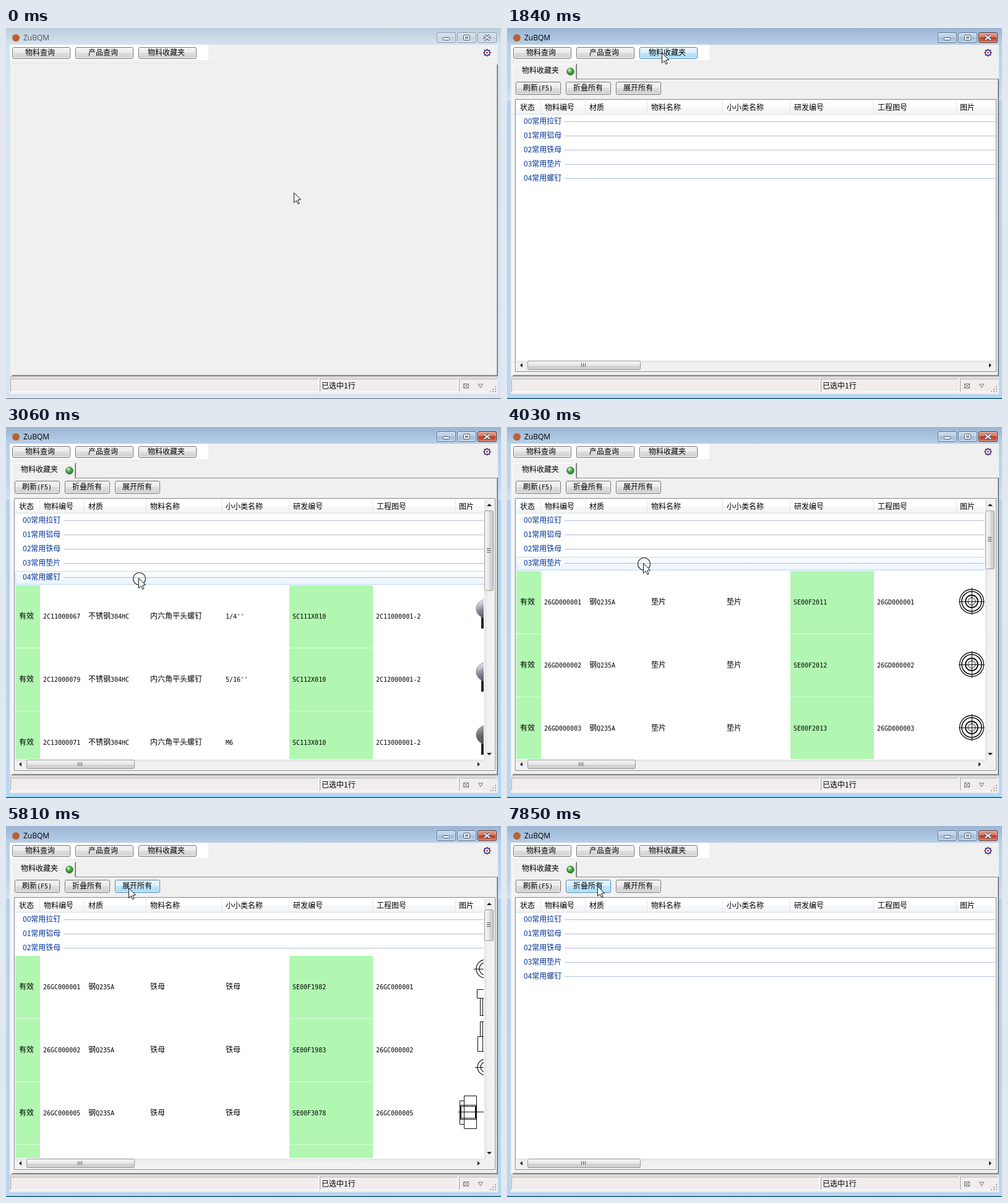
Write an HTML page with a canvas that moves like this. It is 800x600 px and loops after 8 s.

```html
<!DOCTYPE html>
<html lang="zh">
<head>
<meta charset="utf-8">
<style>
html, body { margin: 0; width: 100%; height: 100%; overflow: hidden; }
canvas { display: block; width: 800px; height: 600px; }
</style>
</head>
<body>
<canvas id="stage" width="800" height="600"></canvas>
<script>
const g = document.getElementById('stage').getContext('2d');
const LOOP = 8000;
const UI = '12px "Noto Sans CJK SC", "Noto Sans CJK JP", sans-serif';
const MONO = '10px "DejaVu Sans Mono", monospace';

// Cursor moves: start, end, number of steps, target x, target y
const moves = [
  [430, 1020, 5, 250, 40], [2120, 2790, 6, 214, 244], [3210, 3600, 4, 220, 220],
  [4170, 4450, 3, 228, 191], [4970, 5660, 6, 152, 103], [5810, 5810, 1, 198, 100],
  [5930, 5930, 1, 197, 97], [7030, 7165, 2, 146, 96], [7850, 7850, 1, 146, 97]
];
const clicks = [[1450, 1840], [2925, 3210], [3600, 4170], [4450, 4970], [6200, 6480], [7300, 7570]];
// Groups from this index on are expanded (5 = none)
const stages = [[0, 5], [3060, 4], [4030, 3], [4730, 2], [6340, 0], [7435, 5]];
const thumbLen = [31, 40, 51, 95, 130];

const GREEN = '#b1f7b1', YELLOW = '#fafa00';
const colX = [21, 60, 133, 233, 355, 463, 598, 732];
const heads = ['状态', '物料编号', '材质', '物料名称', '小小类名称', '研发编号', '工程图号', '图片'];
const groups = [
  { name: '00常用拉钉', color: YELLOW, pics: [target, target], rows: [
    '待定|26GA000001|铁1010A|平头铆螺母|拉钉|SE00F1988|26GA000001',
    '待定|26GA000002|铁1010A|平头铆螺母|拉钉|SE00F1989|26GA000002'] },
  { name: '01常用铝母', color: GREEN, pics: [tube, y => tube(y - 10, 6)], rows: [
    "有效|2422000003|铝6063/T5|铝母型铝件|攻牙1/4|AC0402-18|2422000003", '有效'] },
  { name: '02常用铁母', color: GREEN, pics: [topPlan, lowPlan, nut], rows: [
    '有效|26GC000001|钢Q235A|铁母|铁母|SE00F1982|26GC000001',
    '有效|26GC000002|钢Q235A|铁母|铁母|SE00F1983|26GC000002',
    '有效|26GC000005|钢Q235A|铁母|铁母|SE00F3078|26GC000005', '有效'] },
  { name: '03常用垫片', color: GREEN, pics: [target, target, target], rows: [
    '有效|26GD000001|钢Q235A|垫片|垫片|SE00F2011|26GD000001',
    '有效|26GD000002|钢Q235A|垫片|垫片|SE00F2012|26GD000002',
    '有效|26GD000003|钢Q235A|垫片|垫片|SE00F2013|26GD000003', '有效'] },
  { name: '04常用螺钉', color: GREEN, pics: [screw, screw, y => screw(y, '#a8a8a8', '#686868')], rows: [
    "有效|2C11000067|不锈钢304HC|内六角平头螺钉|1/4''|SC111X010|2C11000001-2",
    "有效|2C12000079|不锈钢304HC|内六角平头螺钉|5/16''|SC112X010|2C12000001-2",
    '有效|2C13000071|不锈钢304HC|内六角平头螺钉|M6|SC113X010|2C13000001-2'] }
];

function box(x, y, w, h, fill) {
  g.fillStyle = fill;
  g.fillRect(x, y, w, h);
}
function grad(x0, y0, x1, y1, ...stops) {
  const s = g.createLinearGradient(x0, y0, x1, y1);
  stops.forEach(([at, c]) => s.addColorStop(at, c));
  return s;
}
function round(x, y, w, h, r, fill, edge) {
  g.beginPath();
  g.roundRect(x + .5, y + .5, w - 1, h - 1, r);
  if (fill) { g.fillStyle = fill; g.fill(); }
  if (edge) { g.lineWidth = 1; g.strokeStyle = edge; g.stroke(); }
}
function frame(x, y, w, h, c) { round(x, y, w, h, 0, null, c); }
function poly(pts, fill, edge, open) {
  g.beginPath();
  pts.forEach(([x, y]) => g.lineTo(x, y));
  if (!open) g.closePath();
  if (fill) { g.fillStyle = fill; g.fill(); }
  if (edge) { g.lineWidth = 1; g.strokeStyle = edge; g.stroke(); }
}
function oval(x, y, rx, ry, fill, edge, w = 1, turn = 0) {
  g.beginPath();
  g.ellipse(x, y, rx, ry, turn, 0, Math.PI * 2);
  if (fill) { g.fillStyle = fill; g.fill(); }
  if (edge) { g.lineWidth = w; g.strokeStyle = edge; g.stroke(); }
}
function text(s, x, mid, color = '#000', font = UI) {
  g.font = font;
  g.fillStyle = color;
  g.fillText(s, x, mid + 4);
}
// Chinese and Latin runs use different fonts
function mixed(s, x, mid) {
  for (const run of s.match(/[ -~]+|[^ -~]+/g)) {
    text(run, x, mid, '#000', run < '\x7f' ? MONO : UI);
    x += g.measureText(run).width;
  }
}

function button(label, x, y, w, h, tx, s) {
  const hot = s.x >= x && s.x < x + w && s.y >= y && s.y < y + h;
  const c = hot ? ['#eaf6fd', '#d9f0fc', '#bee6fd', '#a7d9f5'] : ['#f3f3f3', '#ebebeb', '#dddddd', '#cfcfcf'];
  round(x, y, w, h, 2.5, grad(0, y, 0, y + h, [0, c[0]], [.5, c[1]], [.5, c[2]], [1, c[3]]), hot ? '#3c7fb1' : '#707070');
  round(x + 1, y + 1, w - 2, h - 2, 1.5, null, 'rgba(255,255,255,.75)');
  mixed(label, tx, y + h / 2 | 0);
}

function captionButtons(active) {
  [696, 729, 762].forEach((x, i) => {
    const red = active && i === 2;
    const c = red ? ['#e3a391', '#d6715b', '#b93a22', '#d27a5c']
      : active ? ['#cbdcee', '#b9cfe6', '#a3bdd9', '#b9d1e9'] : ['#d5e1ed', '#cddae8', '#c3d2e2', '#cfdcea'];
    round(x, 7, 31, 17, 2.5, grad(0, 7, 0, 24, [0, c[0]], [.5, c[1]], [.5, c[2]], [1, c[3]]),
      red ? '#5c2420' : active ? '#60758f' : '#8796a8');
    round(x + 1, 8, 29, 15, 2, null, 'rgba(255,255,255,.45)');
  });
  const ink = '#4a5665';
  round(706, 15, 11, 5, 1, '#fff', ink);
  round(739, 11, 11, 9, 1, '#fff', ink);
  round(742, 14, 5, 3, 0, '#c5d3e2', ink);
  g.lineCap = 'butt';
  [[4.5, ink], [2.2, '#fff']].forEach(([w, c]) => {
    g.beginPath();
    g.moveTo(773, 12); g.lineTo(782, 19);
    g.moveTo(782, 12); g.lineTo(773, 19);
    g.lineWidth = w; g.strokeStyle = c; g.stroke();
  });
}

function gear() {
  for (let i = 0; i < 8; i++) {
    const a = i * Math.PI / 4;
    oval(777.5 + 5 * Math.cos(a), 40 + 5 * Math.sin(a), 1.3, 1.3, i % 2 ? '#25258c' : '#b02030');
  }
  oval(777.5, 40, 4.2, 4.2, '#f4f4ff', '#26267e', 1.2);
  oval(777.5, 40, 1.4, 1.4, '#c02030');
}

function windowFrame(s) {
  box(0, 0, 800, 600, s.active
    ? grad(0, 0, 0, 600, [0, '#9bb5d2'], [.045, '#b7cfe8'], [.15, '#bdd5ee'], [.194, '#d0e3f4'], [.197, '#b5d1ec'], [1, '#b9d6f0'])
    : grad(0, 0, 0, 600, [0, '#bfccda'], [.045, '#d5e2ef'], [1, '#d7e4f2']));
  if (s.active) box(0, 598, 800, 1, '#36bfe8');
  box(0, 599, 800, 1, s.active ? '#26384a' : '#555b62');
  oval(16, 16, 6, 6, '#b9622f');
  text('ZuBQM', 28, 16, s.active ? '#000' : '#4c5660', '12px "Open Sans", "Noto Sans", sans-serif');
  captionButtons(s.active);
  box(6, 27, 789, 565, '#f0f0f0');
  box(7, 27, 320, 25, '#fff');
  button('物料查询', 10, 31, 94, 19, 31, s);
  button('产品查询', 112, 31, 94, 19, 133, s);
  button('物料收藏夹', 214, 31, 94, 19, 229, s);
  gear();
}

function statusBar() {
  box(6, 564, 789, 1, '#a0a0a0');
  box(6, 565, 789, 27, '#f1eded');
  box(6, 565, 789, 1, '#fff');
  [[7, 499], [507, 224], [732, 62]].forEach(([x, w], i) => {
    box(x, 567, w, 1, '#a0a0a0');
    box(x, 567, 1, 22, '#a0a0a0');
    box(x, 588, w, 1, '#fff');
    if (i < 2) box(x + w - 1, 567, 1, 22, '#fff');
  });
  text('已选中1行', 510, 579);
  frame(739, 575, 9, 8, '#777');
  poly([[740, 576], [747, 582]], null, '#777', true);
  poly([[747, 576], [740, 582]], null, '#777', true);
  poly([[763.5, 576], [770.5, 576], [767, 582]], null, '#777');
  for (let r = 0; r < 3; r++)
    for (let c = 0; c <= r; c++) box(790 - c * 4, 579 + r * 4, 2, 2, '#a8a4a4');
}

function panelEdges(top) {
  box(9, 59, 1, 503, '#fff');
  box(10, 561, 784, 1, '#a0a0a0');
  box(9, 562, 786, 1, '#696969');
  box(793, top, 1, 503 - top + 59, '#a0a0a0');
  box(794, top, 1, 504 - top + 59, '#696969');
}

function emptyPanel() {
  box(9, 59, 785, 1, '#fff');
  box(9, 58, 785, 1, '#dedede');
  panelEdges(59);
  box(8, 59, 1, 503, '#dedede');
}

function target(y) {
  const cx = 751, cy = y + 49;
  [[19.5, 1.3], [16, 1.6], [10, 1.8], [6, 1]].forEach(([r, w]) => oval(cx, cy, r, r, null, '#111', w));
  box(cx - 21, cy, 42, 1, '#111');
  box(cx, cy - 22, 1, 44, '#111');
}
function tube(y, dx = 0) {
  g.save();
  g.translate(dx, y - 394);
  poly([[735, 443], [764, 429], [763, 421], [772, 415], [790, 410], [790, 470], [772, 476], [752, 485]],
    grad(755, 420, 775, 475, [0, '#707070'], [.4, '#4a4a4a'], [1, '#2c2c2c']));
  oval(745, 463, 11, 22, '#606060', '#393939', 1, -.38);
  oval(747, 463, 5.5, 10, '#b9b9b9', '#262626', 1, -.38);
  g.restore();
}
function plan(cy, r) {
  oval(775, cy, r, r, null, '#111', 1.2);
  oval(775, cy, r - 5, r - 5, null, '#111', 1.2);
  box(775 - r - 4, cy, 30, 1, '#111');
}
function topPlan(y) {
  plan(y + 21, 15);
  frame(761, y + 54, 30, 15, '#111');
  frame(766, y + 68, 20, 29, '#111');
  box(770, y + 69, 1, 28, '#111');
}
function lowPlan(y) {
  frame(766, y + 4, 20, 25, '#111');
  box(770, y + 4, 1, 48, '#111');
  frame(762, y + 28, 30, 25, '#111');
  plan(y + 78, 13);
}
function nut(y) {
  frame(740, y + 22, 21, 54, '#111');
  frame(733, y + 30, 8, 39, '#111');
  frame(734, y + 37, 26, 24, '#111');
  frame(735, y + 39, 24, 20, '#111');
  box(731, y + 48, 41, 1, '#111');
}
function screw(y, light = '#eef0f4', dark = '#8c929c') {
  box(768, y + 46, 6, 24, '#202226');
  oval(779, y + 38, 19, 16, grad(762, y + 26, 772, y + 52, [0, light], [.5, dark], [1, '#50545c']), '#6a6e76', .8);
}

function groupHead(name, mid, right, hot) {
  if (hot) round(15, mid - 10, right + 4, 22, 2, grad(0, mid - 10, 0, mid + 12, [0, '#fdfeff'], [1, '#e9f3fd']), '#b9d9f3');
  text(name, 27, mid, '#003399');
  box(93, mid, right - 93, 1, '#b0c0de');
}

function dataRow(group, i, y, limit) {
  const cells = group.rows[i].split('|');
  [[15, 40, 0], [458, 135, 5]].forEach(([x, w, col]) => {
    if (col < limit) {
      box(x, y, w, 101, group.color);
      box(x, y + 101, w, 1, group.color === YELLOW ? '#fdfd9a' : '#e2fce2');
    }
  });
  cells.slice(0, limit).forEach((c, k) => mixed(c, colX[k], y + 50));
  if (limit > 7 && group.pics[i]) group.pics[i](y);
}

function groupList(s, right) {
  g.save();
  g.beginPath();
  g.rect(14, 140, right - 14, 397);
  g.clip();
  let mid = 151;
  groups.forEach((group, k) => {
    const hot = s.y >= mid - 10 && s.y < mid + 12;
    // During the repaint only the hovered group and part of its rows show
    if (!s.repaint || k >= 2) groupHead(group.name, mid, right, hot);
    if (k < s.open) { mid += 23; return; }
    group.rows.forEach((_, i) => {
      const limit = s.repaint && i < s.repaint ? (i ? 4 : 0) : 8;
      if (limit) dataRow(group, i, mid + 13 + i * 102, limit);
    });
    mid += 26 + 102 * (k === 4 ? 10 : group.rows.length);
  });
  g.restore();
}

function thumb(x, y, w, h) {
  const wide = w > h;
  round(x, y, w, h, 2, wide
    ? grad(0, y, 0, y + h, [0, '#f6f6f6'], [.5, '#e8e8e8'], [.5, '#d8d8d8'], [1, '#cacaca'])
    : grad(x, 0, x + w, 0, [0, '#f6f6f6'], [.5, '#e8e8e8'], [.5, '#d8d8d8'], [1, '#cacaca']), '#979797');
  const cx = x + (w >> 1), cy = y + (h >> 1);
  for (let i = -1; i < 2; i++) {
    if (wide) box(cx + i * 3 - 1, cy - 3, 1, 6, '#555');
    else box(cx - 3, cy + i * 3 - 1, 6, 1, '#555');
  }
}

function scrollBars(right, open) {
  box(15, 538, 774, 16, grad(0, 538, 0, 554, [0, '#e3e3e3'], [.3, '#f0f0f0'], [1, '#f2f2f2']));
  const end = right - 9;
  poly([[25, 542], [25, 549], [21, 545.5]], '#222');
  poly([[end - 1, 542], [end - 1, 549], [end + 3, 545.5]], '#222');
  thumb(33, 538, open < 5 ? 175 : 183, 15);
  if (open === 5) return;
  box(773, 117, 16, 421, grad(773, 0, 789, 0, [0, '#e3e3e3'], [.3, '#f0f0f0'], [1, '#f2f2f2']));
  box(773, 538, 16, 16, '#f0f0f0');
  poly([[777, 128], [785, 128], [781, 124]], '#222');
  poly([[777, 527], [785, 527], [781, 531]], '#222');
  thumb(773, 135, 15, thumbLen[open]);
}

function favorites(s) {
  panelEdges(82);
  box(11, 58, 101, 1, '#fff');
  box(111, 59, 1, 23, '#a0a0a0');
  box(112, 58, 1, 25, '#696969');
  box(113, 82, 682, 1, '#8a8a8a');
  text('物料收藏夹', 24, 69);
  const ball = g.createRadialGradient(100.5, 67.5, 1, 102.5, 70.5, 6.5);
  ball.addColorStop(0, '#c5efbd');
  ball.addColorStop(.45, '#4fae48');
  ball.addColorStop(1, '#1f6e22');
  oval(102.5, 70.5, 5.8, 5.8, ball, '#2f6a30', .8);
  button('刷新(F5)', 14, 87, 73, 21, 26, s);
  button('折叠所有', 95, 87, 73, 21, 107, s);
  button('展开所有', 176, 87, 73, 21, 188, s);

  box(13, 115, 778, 441, '#fff');
  frame(13, 115, 778, 441, '#828790');
  const right = s.open < 5 ? 772 : 789;
  box(14, 116, right - 14, 23, grad(0, 116, 0, 139, [0, '#fff'], [.5, '#fff'], [.5, '#f8f9fa'], [1, '#f2f3f5']));
  box(14, 139, right - 14, 1, '#dcdee2');
  [54, 126, 226, 348, 457, 592, 726].forEach(x => box(x, 117, 1, 22, '#e3e5e9'));
  heads.forEach((h, i) => text(h, colX[i] + (i === 1 || i > 4 && i < 7 ? 1 : 0), 129));
  groupList(s, right);
  scrollBars(right, s.open);
}

function pointer({ x, y, ring }) {
  if (ring) oval(x + 1.5, y + 1.5, 10, 10, null, '#111', 1.1);
  g.save();
  g.translate(x + .5, y + .5);
  poly([[0, 0], [0, 16], [3.7, 12.5], [6.3, 18], [8.6, 17], [6.2, 11.5], [11, 11]], '#fff', '#111');
  g.restore();
}

function stateAt(t) {
  let x = 465, y = 266;
  for (const [from, to, n, tx, ty] of moves) {
    if (t < from) break;
    const gap = (to - from) / (n - 1) || 1;
    const p = Math.min(n, Math.floor((t - from) / gap + .01) + 1) / n;
    const e = p * p * (3 - 2 * p);
    x += (tx - x) * e;
    y += (ty - y) * e;
  }
  return {
    x: Math.round(x), y: Math.round(y),
    ring: clicks.some(([a, b]) => t >= a && t < b),
    open: stages.filter(([at]) => t >= at).pop()[1],
    active: t >= 1450,
    loaded: t >= 1645,
    repaint: t >= 4730 && t < 4850 ? 4 : t >= 4850 && t < 4970 ? 2 : 0
  };
}

function draw() {
  const s = stateAt(performance.now() % LOOP);
  windowFrame(s);
  if (s.loaded) favorites(s); else emptyPanel();
  statusBar();
  pointer(s);
  requestAnimationFrame(draw);
}
draw();
</script>
</body>
</html>
```
